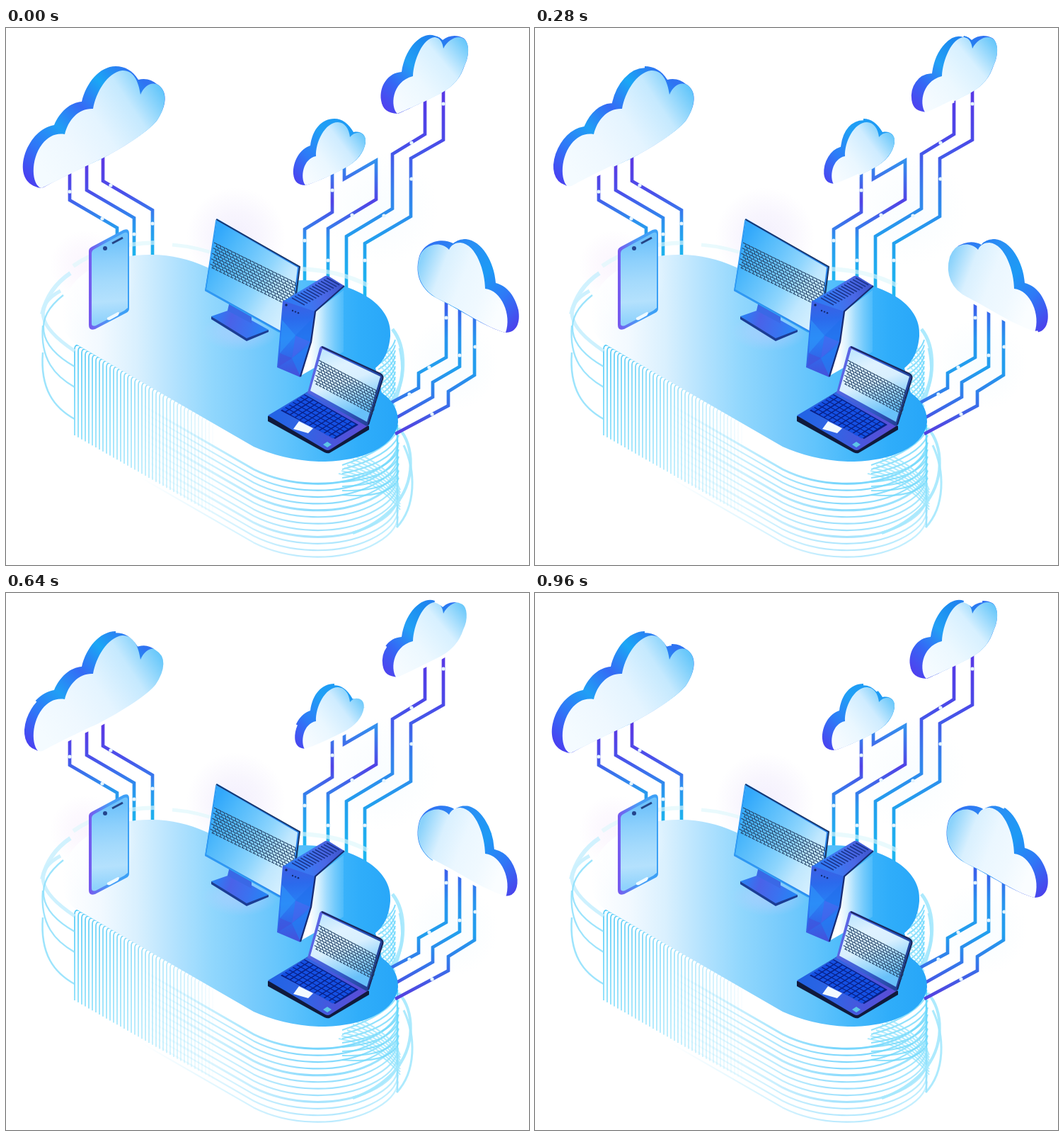
Recreate the animation shown at these times as an HTML page with a canvas. Size 739 px wide and 758 px high, loop 1000 ms.

```html
<!DOCTYPE html>
<html lang="en">
<head>
<meta charset="utf-8">
<title>Cloud network</title>
<style>
html, body { margin: 0; width: 100%; height: 100%; overflow: hidden; background: #fff; }
canvas { display: block; }
</style>
</head>
<body>
<canvas id="stage" width="739" height="758"></canvas>
<script>
const W = 739, H = 758, LOOP = 1000, STEP = 40;
const view = document.getElementById('stage').getContext('2d');
const scene = document.createElement('canvas');
scene.width = W;
scene.height = H;
const g = scene.getContext('2d');

// Linear gradient with evenly spaced colours
function lin(x0, y0, x1, y1, ...cols) {
  const gr = g.createLinearGradient(x0, y0, x1, y1);
  cols.forEach((c, i) => gr.addColorStop(i / (cols.length - 1), c));
  return gr;
}
function fill(d, style) {
  g.fillStyle = style;
  g.fill(new Path2D(d));
}
function line(d, style, width = 1) {
  g.strokeStyle = style;
  g.lineWidth = width;
  g.stroke(new Path2D(d));
}
function dot(x, y, r, style) {
  g.fillStyle = style;
  g.beginPath();
  g.arc(x, y, r, 0, 7);
  g.fill();
}
function glow(x, y, r, rgb, a) {
  const gr = g.createRadialGradient(x, y, 0, x, y, r);
  gr.addColorStop(0, `rgba(${rgb},${a})`);
  gr.addColorStop(.5, `rgba(${rgb},${a * .6})`);
  gr.addColorStop(1, `rgba(${rgb},0)`);
  dot(x, y, r, gr);
}

const clouds = [
  {
    edge: 'M155,54C132,54 113,78 107,104C91,105 76,118 68,137C50,140 35,155 27,177C20,198 24,218 42,224Q47,227 53,225C63,219 115,193 132,186C160,172 200,147 213,131C228,109 229,88 213,79C207,74 198,70 187,73C179,60 168,54 155,54Z',
    face: 'M50,226C36,222 34,186 51,164C60,153 70,148 83,150C88,129 103,113 123,114C127,91 143,63 164,60C179,59 187,73 190,94C196,80 207,75 216,81C228,90 227,111 213,131C199,148 161,172 132,186C114,194 63,220 50,226Z',
    side: [28, 215, 178, 60, '#4b3df0', '#2f76f7', '#209ff5', '#356af5', '#1aa7f5', '#2f73f2'],
    tint: [55, 205, 226, 92, '#f4fbff', '#eff8ff', '#e4f4ff', '#c5e9fe', '#5ec4fa']
  },
  {
    edge: 'M464,128C446,128 433,143 430,166C416,170 405,188 406,206C407,217 413,222 423,222C438,218 460,207 478,198C497,188 506,175 508,162C509,150 501,145 491,147C484,135 475,128 464,128Z',
    face: 'M423,222C415,211 420,184 438,181C437,161 451,133 469,133C478,133 485,142 486,154C493,146 504,145 508,156C509,168 502,182 485,194C465,206 438,218 423,222Z',
    side: [408, 215, 488, 140, '#4a43ef', '#2d7bf7', '#209ff5', '#1d9bf5'],
    tint: [425, 212, 507, 150, '#f6fbff', '#eaf7ff', '#cfecff', '#62c5fa']
  },
  {
    edge: 'M606,11C588,4 564,27 559,62C540,63 527,82 530,102C532,115 539,120 554,121C568,115 596,101 614,92C633,82 643,69 648,53C656,37 654,19 646,14C637,9 625,10 617,17C613,13 610,12 606,11Z',
    face: 'M553,121C543,112 544,76 575,68C576,45 589,14 606,13C614,14 617,21 618,29C625,15 640,9 648,16C656,24 654,42 647,55C642,70 632,83 613,93C594,103 567,115 553,121Z',
    side: [531, 110, 630, 12, '#5040ee', '#3468f5', '#23a0f5', '#1b8bef', '#2f72f2'],
    tint: [556, 108, 654, 25, '#f5fbff', '#ecf8ff', '#d7f0ff', '#68c7fa']
  },
  {
    edge: 'M632,304C617,296 592,300 584,322C576,350 588,371 610,382C640,397 680,424 706,430C722,430 727,415 724,398C719,378 708,364 692,360C690,330 672,300 650,298C642,298 637,300 632,304Z',
    face: 'M626,313C612,298 588,308 584,324C577,350 589,371 612,383C645,398 680,424 706,430C715,405 700,370 677,368C677,345 665,305 642,303C635,303 629,306 626,313Z',
    side: [605, 300, 722, 420, '#2f73f3', '#2890f4', '#1d9af5', '#2f78f6', '#4a43ec'],
    tint: [580, 345, 700, 390, '#8ad2fb', '#d9f0fe', '#ebf7ff', '#f0f9ff', '#fafdff']
  }
];

function drawCloud(c) {
  fill(c.edge, lin(...c.side));
  fill(c.face, lin(...c.tint));
}

function drawCables() {
  g.lineJoin = 'miter';
  const left = lin(0, 190, 0, 318, '#5b3ae4', '#4b50ea', '#2b94ee', '#1eb2ee');
  const right = lin(0, 90, 0, 370, '#5838e6', '#4a4ae8', '#3580ec', '#22a0ee', '#1fb6f0');
  const mid = lin(0, 190, 0, 355, '#3490ee', '#5142e6', '#2b98ee', '#1fb6f0');
  const low = lin(0, 395, 0, 570, '#3a62ec', '#2896ee', '#229fee', '#3674ea', '#5440e0');
  line('M90,205V243L157,282V298M114,190V229L181,268V322M137,180V216L207,257V322', left, 4.7);
  line('M592,92V150L546,178V255L481,294V372M618,80V158L572,184V266L507,304V385', right, 4.7);
  line('M461,200V260L422,284V365M478,190V213L523,187V242L455,283V360', mid, 4.7);
  line('M622,385V465L583,487V508L542,530M641,395V478L603,500V521L548,552M662,408V490L625,513V533L550,573', low, 4.7);
  const lights = [90,231, 136,269, 148,222, 181,291, 207,276, 461,229, 422,300, 489,264, 455,328, 573,162, 534,265, 618,107, 573,213, 507,328, 622,409, 663,450, 641,462, 598,479, 570,517, 602,545];
  for (let i = 0; i < lights.length; i += 2) dot(lights[i], lights[i + 1], 2.6, '#e5f5ff');
}

function drawRings() {
  const curl = d => `M190,${501 + d}L350,${593 + d}C400,${618 + d} 468,${620 + d} 515,${598 + d}C540,${586 + d} 553,${572 + d} 554,${556 + d}`;
  const fade = lin(190, 0, 554, 0, 'rgba(150,225,253,0)', 'rgba(140,222,253,.6)', 'rgba(100,207,252,.9)', 'rgba(120,220,253,.85)');
  for (let i = 0; i < 12; i++) {
    g.globalAlpha = 1 - i * .045;
    line(curl(30 + i * 9.4), fade, i % 4 ? 2.2 : 3);
  }
  g.globalAlpha = 1;
  line('M553,560V705', lin(0, 560, 0, 705, '#59d6fb', '#a4e5fd'), 2.5);

  for (let x = 97; x < 295; x += 5) {
    const k = (x - 97) / 198, y = 445 + k * 111, b = 575 + k * 113;
    const a = Math.pow(1 - k, .8);
    line(`M${x},${b}V${y + 9}Q${x},${y} ${x + 8},${y + 4}`,
      lin(0, y, 0, b, `rgba(90,205,248,${a})`, `rgba(110,216,250,${a * .8})`), 1.8);
  }

  // Woven arcs on the right flank
  for (let i = 0; i < 12; i++) {
    const y = 440 + i * 7.5;
    line(`M550,${y}Q546,${y + 15} 526,${y + 27}`, 'rgba(100,212,252,.8)', 2);
    line(`M529,${y}Q542,${y + 12} 550,${y + 27}`, 'rgba(150,230,253,.75)', 2);
  }
  for (let i = 0; i < 8; i++) {
    const y = 565 + i * 10;
    line(`M555,${y}Q542,${y + 30} 475,${y + 52 - i * 4}`, 'rgba(115,218,252,.8)', 2);
    line(`M${470 + i * 4},${629 - i * 4}Q${525 + i * 3},${638 - i * 2} 557,${680 - i * 4}`, 'rgba(150,228,253,.75)', 2);
  }
  const pale = 'rgba(165,232,253,.9)';
  line('M546,425C566,450 566,500 544,528', pale, 5);
  line('M556,452Q565,490 551,525', pale, 3);
  line('M555,565C577,588 580,640 548,676C532,693 513,705 490,713', pale, 4);
  line('M562,589C579,625 580,675 552,705', pale, 3);

  const arc = 'rgba(140,224,252,.85)';
  line('M97,456C40,418 42,390 77,371', 'rgba(200,240,254,.9)', 5);
  line('M81,377C39,410 44,448 97,478', arc, 2.3);
  line('M52,420C48,468 69,491 97,507', arc, 2.3);
  line('M52,458C48,510 68,536 97,552', arc, 2.5);
  line('M51,404C57,378 70,360 91,346', 'rgba(205,241,254,.9)', 6);
}

function drawDeck() {
  const haze = 'rgba(222,248,252,.65)';
  line('M95,336C126,314 166,304 211,303', haze, 6);
  line('M235,306Q270,309 302,321', haze, 5);
  line('M415,340Q470,342 511,363', haze, 6);
  const deck = 'M97,445C55,409 83,320 205,320C265,320 300,348 350,367Q382,356 420,356C490,357 547,389 543,435C541,458 533,471 522,480L531,515C548,527 554,540 554,556C551,592 500,613 442,612C407,611 375,602 350,591Z';
  fill(deck, lin(80, 0, 554, 0, '#ffffff', '#f2f9ff', '#d9f0fe', '#b3e2fe', '#91d7fd', '#7accfc', '#61c4fc', '#45b8fb', '#2fadfa', '#27a6f8'));
  g.save();
  g.clip(new Path2D(deck));
  glow(110, 350, 75, '255,255,255', .8);
  g.restore();
}

// Rows of linked cells on a slanted panel
function cells(x, y, ux, uy, vx, vy, rows, cols) {
  g.save();
  g.transform(ux, uy, vx, vy, x, y);
  g.beginPath();
  for (let r = 0; r <= rows; r++) {
    for (let c = 0; c < cols; c++) {
      const a = (c + (r % 2) * .5) / cols, b = a + .8 / cols, top = r / rows;
      if (b > 1.02) continue;
      g.moveTo(a, top);
      g.lineTo(b, top);
      if (r < rows) g.lineTo(b, top + .8 / rows);
    }
  }
  g.restore();
  g.strokeStyle = '#244367';
  g.lineWidth = 1.1;
  g.stroke();
}

function drawPhone() {
  fill('M117,315Q117,311 121,309L166,285Q174,282 174,290V396Q174,400 170,402L126,425Q117,428 117,419Z', lin(117, 0, 174, 0, '#7857ee', '#4a9df6', '#3aa0f6'));
  fill('M121,318Q121,314 125,312L167,289Q172,287 172,292V395L167,399L127,420Q121,422 121,417Z', lin(143, 300, 152, 414, '#6fc2fb', '#8dd0fc', '#a4dafc', '#b4e1fd', '#8fd2fc'));
  dot(140, 311, 3, '#24458d');
  line('M150,304L165,296', '#254586', 3);
  fill('M143,409L158,401Q162,401 158,406L147,412Q142,413 143,409Z', '#effaff');
}

function drawMonitor() {
  g.save();
  g.translate(331, 429);
  g.scale(1, .5);
  glow(0, 0, 54, '190,205,255', .55);
  g.restore();
  fill('M290,407L319,397L371,426L340,440Z', lin(290, 405, 371, 430, '#2585f6', '#4a62e8', '#3a72f0', '#2288f6'));
  fill('M290,407L340,438L371,426V429L340,442L290,411Z', '#1b3d94');
  fill('M316,386L347,404V417L313,399Z', '#3a68e6');
  fill('M298,269L415,337L402,438L281,371Z', '#2b86ee');
  fill('M298,272L412,338L400,434L283,369Z', lin(287, 310, 409, 385, '#32a8fb', '#4fb9fb', '#6cc6fc', '#8ed5fd', '#bfe7fe', '#d4effe'));
  line('M297,270L415,337L409,384', '#193669', 2);
  line('M297,271L282,370L386,429', '#2f9ef4', 1.5);
  cells(294, 303, 116, 57, -6, 34, 9, 22);
}

function drawTower() {
  fill('M436,401L477,370V457L437,479L416,491Z', lin(429, 0, 477, 0, '#ffffff', '#d9f1fe', '#a0dbfd', '#72cafc', '#4dbbfb'));
  fill('M391,386L451,350Q454,349 457,351L478,364L436,400Z', lin(394, 385, 476, 365, '#2b78f2', '#3a78f2', '#4a68e6', '#3d55cc'));
  for (let i = 0; i < 13; i++) {
    const x = 404 + i * 4.1, y = 381 - i * 2.35;
    line(`M${x},${y}l18,10`, '#1a348c', 1.6);
  }
  fill('M391,385L437,400L431,443L416,493L383,479L387,432Z', lin(400, 384, 407, 491, '#3f5ee2', '#2b6aec', '#2880f5', '#3068ea', '#4452dc'));
  fill('M390,412L409,434L387,459Z', 'rgba(45,150,250,.6)');
  fill('M409,434L430,443L404,466Z', 'rgba(75,98,236,.6)');
  fill('M387,459L404,466L385,478Z', 'rgba(70,75,215,.5)');
  fill('M409,434L432,411L430,443Z', 'rgba(33,110,235,.6)');
  fill('M404,466L429,448L415,490Z', 'rgba(32,130,245,.6)');
  line('M478,364L437,400L431,443L416,492', '#172c75', 2.3);
  dot(396, 391, 1.7, '#122763');
  for (let i = 0; i < 3; i++) dot(405 + i * 4, 399 + i * 1.6, 1.2, '#13286c');
}

function drawLaptop() {
  fill('M370,548L427,513L513,562V567L457,600Q454,601 450,599L370,555Z', '#101a3c');
  fill('M370,547L427,513L512,561L458,595Q455,597 451,595Z', lin(382, 545, 512, 566, '#2363e4', '#3164e4', '#4a55dc', '#5c4cd6'));
  fill('M388,540L422,517L498,560L465,580Z', '#082086');
  const kx = [74, 42], ky = [-33, 21];
  for (let r = 0; r < 6; r++) {
    for (let c = 0; c < 11; c++) {
      const x = 421 + c * kx[0] / 11 + r * ky[0] / 6;
      const y = 518 + c * kx[1] / 11 + r * ky[1] / 6;
      fill(`M${x},${y}l5.4,3l-4.4,2.8l-5.4,-3z`, '#1450e4');
    }
  }
  fill('M414,555L434,565L427,572L406,566Z', '#f2faff');
  fill('M454,584L460,588L454,592L448,588Z', '#5cc5e8');
  fill('M443,452Q445,447 450,450L529,488Q534,491 532,496L513,559Q511,564 506,560L426,515Z', lin(428, 485, 533, 525, '#5f66e6', '#3560d0', '#1f3a8c'));
  fill('M447,453L529,492L510,556L430,512Z', lin(455, 458, 486, 546, '#c4e8fe', '#dff2ff', '#d8effe', '#a0d9fc', '#68c0f9'));
  line('M446,450L529,488Q534,491 532,496L512,560', '#18275c', 2);
  cells(442, 469, 82, 43, -7, 32, 9, 17);
}

function drawScene() {
  g.fillStyle = '#fff';
  g.fillRect(0, 0, W, H);
  glow(325, 295, 70, '226,216,250', .4);
  glow(112, 335, 50, '240,222,250', .3);
  glow(530, 255, 80, '235,248,255', .3);
  glow(630, 475, 65, '233,248,255', .3);
  drawRings();
  drawCables();
  drawDeck();
  clouds.forEach(drawCloud);
  drawPhone();
  drawMonitor();
  drawTower();
  drawLaptop();
}

for (const c of clouds) {
  const p = document.createElementNS('http://www.w3.org/2000/svg', 'path');
  p.setAttribute('d', c.edge);
  c.len = p.getTotalLength();
  c.path = new Path2D(c.edge);
}
drawScene();

// A white trim runs round each cloud, then withdraws from its start
function frame(now) {
  const t = Math.floor(now % LOOP / STEP) * STEP;
  const head = Math.min(1, t / 500), tail = Math.max(0, t / 500 - 1);
  view.drawImage(scene, 0, 0);
  if (head > tail) {
    view.strokeStyle = '#fff';
    view.lineWidth = 4.5;
    for (const { path, len } of clouds) {
      view.setLineDash([0, tail * len, (head - tail) * len, len * 2]);
      view.stroke(path);
    }
  }
  requestAnimationFrame(frame);
}
requestAnimationFrame(frame);
</script>
</body>
</html>
```
